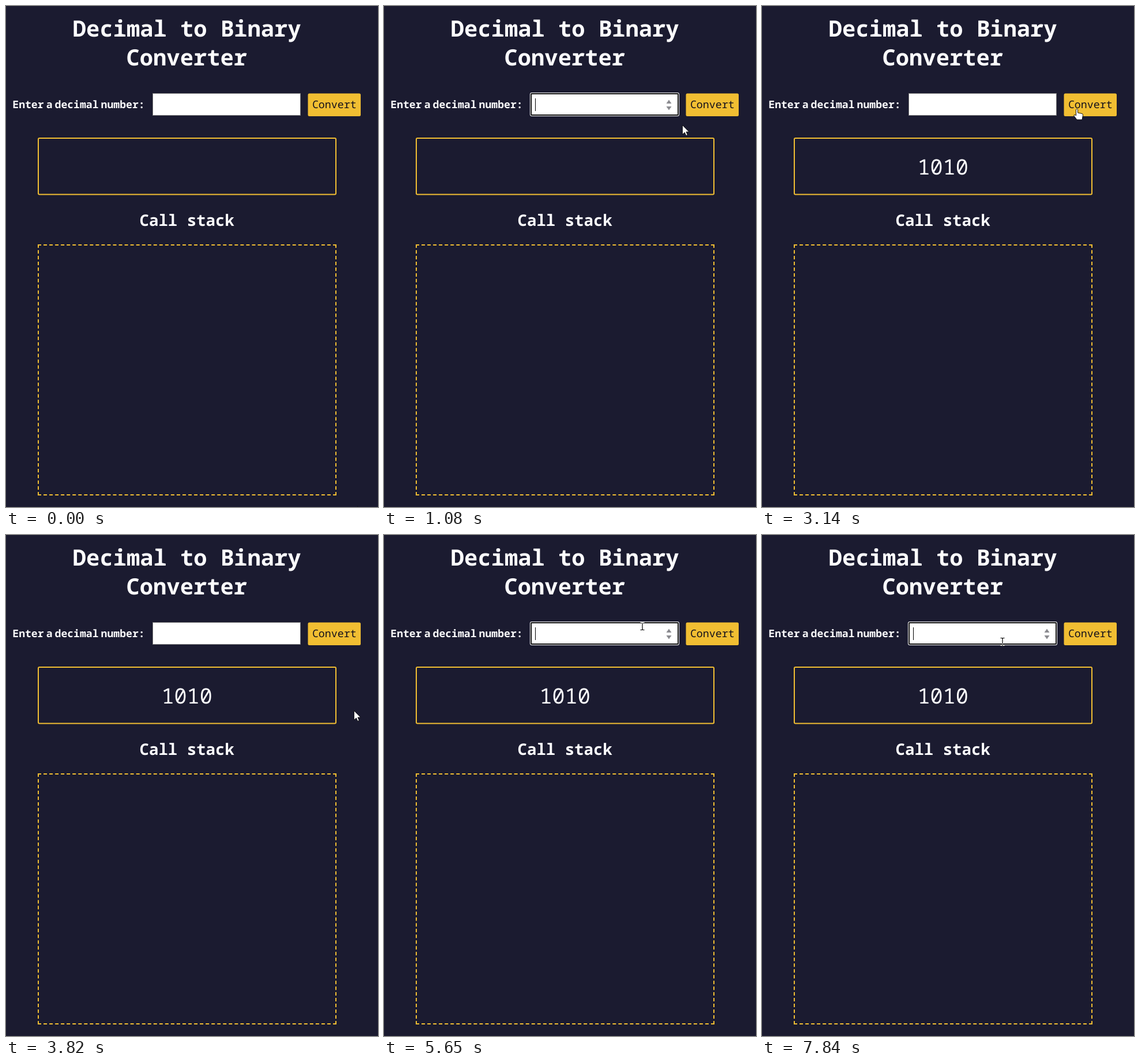
An HTML page that plays this animation: 645 by 868 pixels, repeating every 8 s.

```html
<!DOCTYPE html>
<html lang="en">
<head>
<meta charset="utf-8">
<title>Decimal to Binary Converter</title>
<style>
html, body { margin: 0; width: 100%; height: 100%; overflow: hidden; background: #1b1b30; }
svg { position: absolute; left: 0; top: 0; }
text { font-family: "Noto Sans Mono", "DejaVu Sans Mono", monospace; fill: #fcfcfd; text-rendering: geometricPrecision; }
.mid { text-anchor: middle; }
.title { font-size: 38.8px; font-weight: 700; }
.sub { font-size: 27.4px; font-weight: 700; }
.label { font-size: 18.1px; font-weight: 600; word-spacing: -6.8px; }
.btn { font-size: 18.3px; font-weight: 500; fill: #14101c; }
.result { font-size: 36.8px; }
#typed { font: 20px "Liberation Sans", Arial, sans-serif; fill: #111; }
#stack { position: absolute; left: 55px; top: 413px; width: 514px; height: 431px; border: 2px dashed #f1be32; }
#ibeam { mix-blend-mode: difference; }
</style>
</head>
<body>
<svg width="645" height="868" viewBox="0 0 645 868">
  <rect width="645" height="868" fill="#1b1b30"/>
  <text class="title mid" x="313.7" y="53">Decimal to Binary</text>
  <text class="title mid" x="313.3" y="103">Converter</text>
  <text class="label" x="11.3" y="177">Enter a decimal number:</text>

  <rect x="254.5" y="151.5" width="256" height="38" fill="#fff" stroke="#767676"/>
  <g id="focus">
    <rect x="253.5" y="150.5" width="258" height="40" rx="2" fill="#fff" stroke="#fff"/>
    <rect x="255" y="152" width="255" height="37" rx="1" fill="#fff" stroke="#101010" stroke-width="2"/>
  </g>
  <path id="spinner" d="M489.5 169L494 162.5L498.5 169ZM489.5 174H498.5L494 180.5Z" fill="#8b8b90"/>
  <text id="typed" x="261.5" y="177.5"></text>
  <rect id="caret" y="160" width="1" height="22"/>

  <rect x="523.5" y="151.5" width="91.5" height="39.5" rx="2.5" fill="#f1be32"/>
  <text class="btn mid" x="569.3" y="177">Convert</text>

  <rect x="56" y="229" width="516" height="97.5" rx="2" fill="none" stroke="#f1be32" stroke-width="2"/>
  <text id="result" class="result mid" x="313.6" y="292">1010</text>
  <text class="sub mid" x="313.7" y="381">Call stack</text>
  <foreignObject width="645" height="868"><div id="stack"></div></foreignObject>

  <path id="arrow" d="M.5 .5V16.5L4.3 13L6.8 18.5L9.3 17.4L6.9 12H11.8Z" fill="#fff" stroke="#000" stroke-width=".8"/>
  <path id="ibeam" d="M-3.5 -6.5H-1L0 -5.5L1 -6.5H3.5M0 -5.5V5.5M-3.5 6.5H-1L0 5.5L1 6.5H3.5" fill="none" stroke="#fff" stroke-width="1.2"/>
  <path id="hand" d="M-1.5 1.5Q0 -1 1.5 1.5V7L9 8.5Q10.5 9 10.5 11L9 19H0L-5 12.5Q-5.5 10 -3 10.5L-1.5 12Z" fill="#fff" stroke="#000" stroke-width=".9" stroke-linejoin="round"/>
</svg>
<script>
const LOOP = 8000, BLINK = 530, DIGIT = 11;
const FOCUS = 860, TYPE = [1730, 1910], CONVERT = 3080, REFOCUS = 5650;

// pointer moves: from ms, to ms, x, y
const home = [609, 866];
const moves = [
  [20, 370, 366, 169],
  [700, 1080, 517, 206],
  [2420, 2570, 519, 205],
  [2720, 3080, 546, 178],
  [3490, 3820, 603, 304],
  [3820, 4230, 531, 233],
  [4330, 4900, 450, 185],
  [5160, 5650, 448, 158],
  [5930, 6730, 420, 210],
  [6960, 7320, 417, 185]
];

const $ = id => document.getElementById(id);
const show = (id, on) => $(id).setAttribute("visibility", on ? "visible" : "hidden");
const ease = u => u < .5 ? 4 * u ** 3 : 1 - 4 * (1 - u) ** 3;

function pointer(t) {
  let [x, y] = home;
  for (const [from, to, nx, ny] of moves) {
    const k = ease(Math.min(1, Math.max(0, (t - from) / (to - from))));
    x += (nx - x) * k;
    y += (ny - y) * k;
  }
  return [x, y];
}

function draw(t) {
  const [x, y] = pointer(t);
  const inRow = y >= 152 && y <= 190;
  const overInput = inRow && x >= 254 && x <= 511;
  const overButton = inRow && x >= 523 && x <= 615;
  const shape = overInput ? "ibeam" : overButton ? "hand" : "arrow";
  for (const id of ["arrow", "ibeam", "hand"]) show(id, id === shape);
  $(shape).setAttribute("transform", `translate(${x} ${y})`);

  const focused = t >= FOCUS && t < CONVERT || t >= REFOCUS;
  const digits = t < CONVERT ? TYPE.filter(k => k <= t).length : 0;
  const lastInput = [FOCUS, ...TYPE, REFOCUS].filter(k => k <= t).pop();
  show("focus", focused);
  show("spinner", focused || overInput);
  show("result", t >= CONVERT);
  $("typed").textContent = "10".slice(0, digits);
  $("caret").setAttribute("x", 262 + digits * DIGIT);
  show("caret", focused && (t - lastInput) % (2 * BLINK) < BLINK);
}

function tick() {
  draw(performance.now() % LOOP);
  requestAnimationFrame(tick);
}
tick();
</script>
</body>
</html>
```
